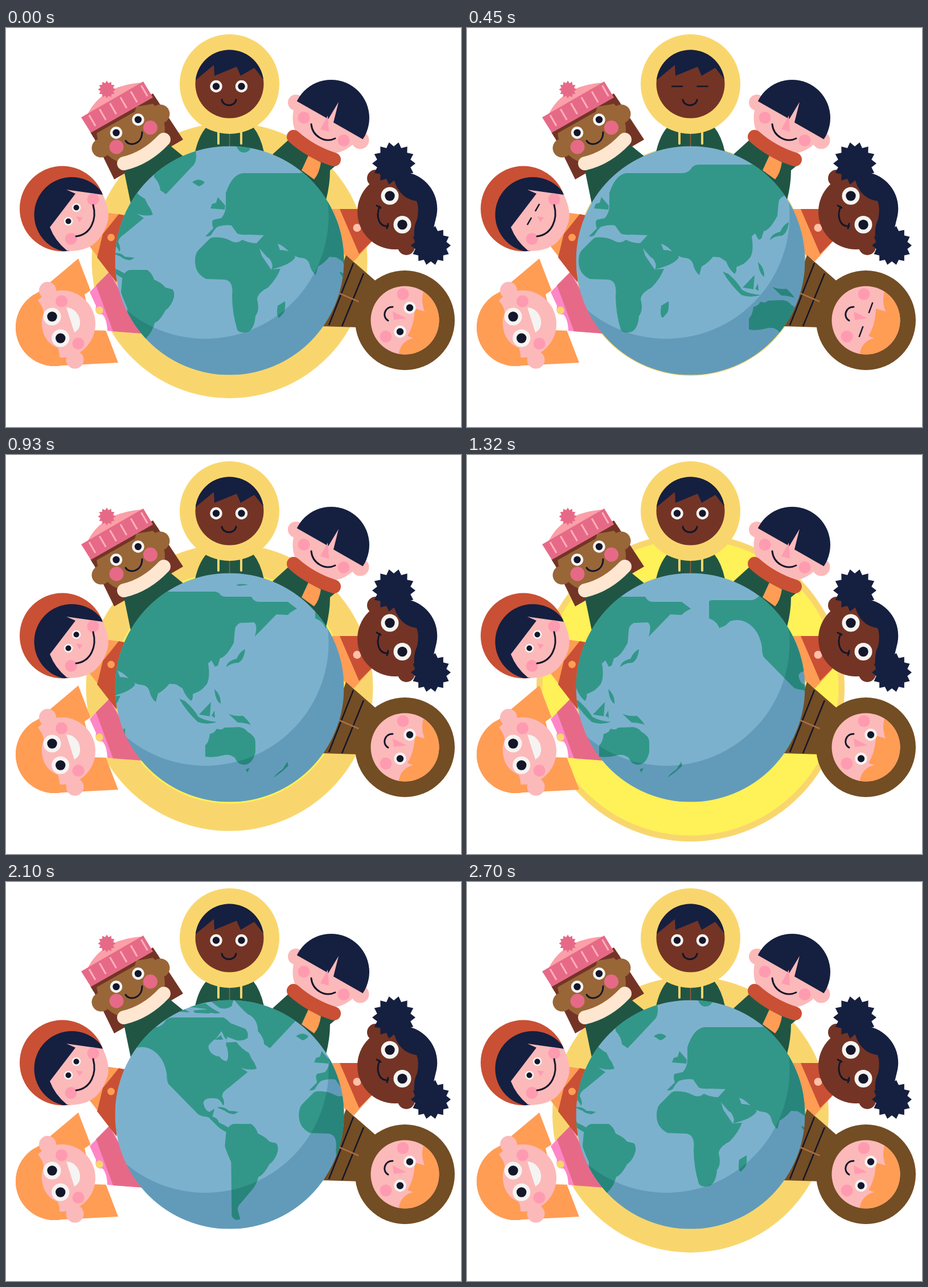
Animation of 799x701 px, one loop 2730 ms. Source, as an HTML page with a canvas:

```html
<!DOCTYPE html>
<html lang="en">
<head>
<meta charset="utf-8">
<title>Children around the globe</title>
<style>
html, body { margin: 0; width: 100%; height: 100%; overflow: hidden; background: #fff; }
canvas { display: block; width: 799px; height: 701px; }
</style>
</head>
<body>
<canvas id="stage" width="799" height="701"></canvas>
<script>
const ctx = document.getElementById('stage').getContext('2d');
const LOOP = 2730, STEP = 30, SPIN = 816 / 2700, WORLD = 817;
const CX = 392.5, CY = 408.5, R = 201;

const C = {
  navy: '#151f40', ink: '#14162a', white: '#f5f4f2', pink: '#fcb9ba', blush: '#ff9bb0',
  rose: '#e66a87', orange: '#ff9d55', rust: '#c95034', brown: '#733425', tan: '#996638',
  coat: '#734d24', green: '#205544', yellow: '#f9d66d', bright: '#fff158',
  sea: '#7cb1cd', land: '#329788', shade: '#cae0e7'
};

function dot(x, y, r, color) {
  ctx.fillStyle = color;
  ctx.beginPath();
  ctx.arc(x, y, r, 0, 7);
  ctx.fill();
}

function shape(d, color) {
  ctx.fillStyle = color;
  ctx.fill(new Path2D(d));
}

function line(d, color = C.ink, w = 3, cap = 'round') {
  ctx.strokeStyle = color;
  ctx.lineWidth = w;
  ctx.lineCap = cap;
  ctx.stroke(new Path2D(d));
}

function clipDot(x, y, r, draw) {
  ctx.save();
  ctx.beginPath();
  ctx.arc(x, y, r, 0, 7);
  ctx.clip();
  draw();
  ctx.restore();
}

function burst(x, y, r, inner, n, color, turn = 0) {
  ctx.fillStyle = color;
  ctx.beginPath();
  for (let i = 0; i < 2 * n; i++) {
    const a = turn + i * Math.PI / n, q = i % 2 ? inner : r;
    ctx.lineTo(x + q * Math.cos(a), y + q * Math.sin(a));
  }
  ctx.fill();
}

// Two eyes on a head tilted by `tilt` degrees
function eyes(closed, list, r, pupil, tilt, half = 10) {
  const a = tilt * Math.PI / 180, dx = half * Math.cos(a), dy = half * Math.sin(a);
  for (const [x, y] of list) {
    if (closed) {
      line(`M${x - dx},${y - dy}L${x + dx},${y + dy}`, C.ink, 2.5, 'butt');
    } else {
      dot(x, y, r, C.white);
      dot(x, y, pupil, C.ink);
    }
  }
}

// Smooth curve through [time, value] points
function curve(p, t) {
  const last = p.length - 1;
  if (t <= p[0][0]) return p[0][1];
  if (t >= p[last][0]) return p[last][1];
  let i = 0;
  while (t > p[i + 1][0]) i++;
  const slope = k => {
    const a = p[Math.max(k - 1, 0)], b = p[Math.min(k + 1, last)];
    return (b[1] - a[1]) / (b[0] - a[0]);
  };
  const [t0, v0] = p[i], [t1, v1] = p[i + 1], h = t1 - t0, u = (t - t0) / h, w = 1 - u;
  return v0 * w * w * (1 + 2 * u) + v1 * u * u * (3 - 2 * u) + h * u * w * (slope(i) * w - slope(i + 1) * u);
}

const outerHalo = [
  [0, 242], [70, 246], [220, 236], [340, 217], [450, 202.5], [530, 197], [600, 203], [760, 226],
  [930, 252], [1080, 266], [1230, 270.5], [1330, 270.3], [1650, 258.5], [1710, 255],
  [1880, 235], [2040, 206], [2120, 190], [2260, 188], [2480, 216], [2700, 242.5]
];
const innerHalo = [
  [840, 185], [930, 204], [1120, 241], [1320, 260], [1420, 262], [1560, 253],
  [1710, 231], [1860, 203], [1960, 184]
];

const africa = 'M350,378L358,370Q364,366 382,367L440,372L452,392L466,424L482,423Q475,441 460,456Q441,466 441,477Q446,496 438,506Q436,530 424,534Q410,537 406,530Q397,500 397,470Q400,444 384,442L352,441Q332,432 332,410Q332,396 338,390Z';
const westAsia = 'M350,366L364,352Q360,340 364,337L378,334Q386,325 386,312L386,290Q397,257 416,255L515,255Q526,254 531,245Q535,240 545,240L590,240L590,409L582,403L568,402Q558,414 548,419L544,434Q536,428 533,415Q530,405 520,404Q505,403 494,390Q486,382 477,379L481,390Q497,390 505,398L508,403Q500,416 466,424L444,390L430,372L385,368L362,362Q358,367 350,366Z';
const eastAsia = 'M580,240L648,240Q655,241 658,246Q661,249 668,249L712,249Q716,258 726,258L776,258L792,270Q780,276 776,281L756,280L718,319Q724,298 716,294L692,295Q683,300 683,308L681,330Q668,355 657,357L653,370L648,372L642,361L636,366Q640,390 634,402Q625,414 616,417L609,420Q610,428 606,432Q596,424 591,410L580,403Z';
const med = 'M358,368Q366,352 372,349Q385,345 396,347L406,361Q412,364 425,363L453,364L440,378Q427,378 415,372Q405,380 395,374Q380,366 358,368Z';
const redSea = 'M445,387L449,400L466,425L468,418Q466,406 458,402Z';
const nearIsles = 'M359,317L362,309L369,307L372,297L385,312L384,319ZM327,271Q338,262 349,271Q343,278 338,278ZM477,488L490,480Q491,494 488,500L480,509Q474,508 477,488ZM404,206H432Q428,219 417,219Q408,218 404,206Z';
const farIsles = 'M387,373Q388,362 405,358Q410,346 420,341Q418,360 408,365Q395,365 387,373ZM304,428L314,432Q330,446 338,460Q352,468 371,469Q352,475 337,469Q318,452 304,428ZM339,456L360,434L358,459ZM361,458L366,449L367,462ZM366,411Q378,422 377,437Q368,432 366,411ZM391,455Q405,460 416,458Q425,466 430,474Q418,470 407,470ZM404,228Q414,225 426,228L410,230Z';
const australia = 'M350,530V510Q356,506 358,490Q366,489 370,481Q380,484 383,479L410,478Q420,480 424,486Q438,494 438,504V522Q433,543 420,544Q408,546 402,532Q392,524 380,528Q365,532 350,530ZM421,552L428,550L424,558ZM494,539L496,546L485,556L470,567Q474,560 486,552Z';
const northAmerica = 'M189,275V257Q190,255 195,255H264Q275,253 280,243Q285,238 294,238H382Q388,242 394,248L420,258Q426,264 424,274Q416,280 404,278L388,272L387,282L404,281Q414,294 426,300Q430,310 436,318L440,328Q426,332 412,326L424,334L390,362Q380,368 379,376Q385,388 381,393Q376,380 366,380Q348,378 346,388Q349,402 357,404L366,398L362,412Q372,415 374,423Q386,428 394,434L388,440Q375,434 368,426L355,413Q342,412 337,408L285,355Q282,350 282,338Q278,312 262,299Q246,286 226,292L217,300L207,304Q203,292 189,287Z';
const southAmerica = 'M386,441Q390,426 400,425H430Q439,431 442,442Q456,448 462,456L474,459Q478,462 477,473Q473,488 462,496Q452,515 443,518Q440,530 434,538L413,563Q405,570 407,578L411,592Q402,597 396,587L395,492Q386,472 384,464Z';
const greenland = 'M442,262Q442,240 424,232Q412,222 398,204H512Q520,228 512,240L463,292L453,285Q452,272 442,262Z';
const westIsles = 'M370,396Q382,393 391,402Q400,402 408,404L400,408Q389,407 384,402ZM285,227L303,220Q316,224 322,229ZM328,226Q350,222 372,227L355,231L332,230ZM318,219L350,213Q360,222 376,230Q360,234 350,223ZM360,210L400,204L396,218Q386,225 374,221Z';
const hudson = 'M355,288Q362,278 368,276L378,262L384,274L388,277Q384,286 388,291Q392,308 387,315Q378,313 375,307Q356,304 355,288Z';

// [x offset, outline, colour]
const atlas = [
  [0, africa, C.land], [0, westAsia, C.land], [0, eastAsia, C.land], [0, nearIsles, C.land],
  [0, med, C.sea], [0, redSea, C.sea], [281, farIsles, C.land], [281, australia, C.land],
  [635, northAmerica, C.land], [635, southAmerica, C.land], [635, greenland, C.land],
  [635, westIsles, C.land], [635, hudson, C.sea], [635, 'M367,277L377,269L381,277Z', C.land]
].map(([x, d, color]) => [x, new Path2D(d), color]);

function globe(t) {
  clipDot(CX, CY, R, () => {
    ctx.fillStyle = C.sea;
    ctx.fillRect(CX - R, CY - R, 2 * R, 2 * R);
    for (const lap of [-1, 0, 1]) {
      for (const [x, path, color] of atlas) {
        ctx.save();
        ctx.translate(x + lap * WORLD - t * SPIN, 0);
        ctx.fillStyle = color;
        ctx.fill(path);
        ctx.restore();
      }
    }
    ctx.globalCompositeOperation = 'multiply';
    ctx.fillStyle = C.shade;
    ctx.beginPath();
    ctx.rect(0, 0, 799, 701);
    ctx.arc(350, 329.5, 216.5, 0, 2 * Math.PI);
    ctx.fill('evenodd');
  });
}

function hoodKid(shut) {
  shape('M352,174Q338,190 332,218H453Q447,190 434,174Z', C.green);
  line('M392.5,184V210', '#a0603b', 1.5);
  line('M373,178V203M413,178V203', C.yellow, 4);
  dot(392.5, 98.5, 87.5, C.yellow);
  dot(392.5, 98.5, 60, C.brown);
  clipDot(392.5, 98.5, 60, () =>
    shape('M330,94L365,65L366,84L405,68L412,84L436,70L455,94V30H330Z', C.navy));
  eyes(shut, [[369, 102.5], [413.5, 102.5]], 10.7, 6.2, 0);
  line('M379,126C381,139 402,139 404,126');
}

function bowlKid() {
  shape('M500,193L468,222L562,302Q569,275 569,250L586,236Z', C.green);
  shape('M531,224L519,250L541,266Q550,256 553,236Z', C.orange);
  dot(509, 131, 14, C.pink);
  dot(622, 197, 15.5, C.pink);
  dot(566.5, 158, 63, C.pink);
  line('M505,191Q535,218 576,231', C.rust, 24);
  clipDot(571, 158, 67, () =>
    shape('M494,119L566,160L584,130L575,166L650,209V80H494Z', C.navy));
  shape('M565,154L552,178L567,182Z', C.blush);
  dot(523, 157.5, 10.5, C.blush);
  dot(593, 197.5, 10.5, C.blush);
  line('M536,169C538,190 560,203 578,194');
}

function bunsKid(shut) {
  shape('M572,318H625L645,372L611,410L594,398Z', C.orange);
  shape('M586,318H625L645,372L620,397Z', C.rust);
  dot(616.5, 351, 7, '#ffbfa8');
  dot(649, 264, 15, C.brown);
  dot(703, 384, 15, C.brown);
  dot(683, 323, 66, C.brown);
  burst(681, 238, 38, 30, 14, C.navy);
  burst(746, 382, 35, 28, 14, C.navy);
  shape('M668,250L706,254A65,65 0 0 1 756,330L744,380L718,376Q714,352 722,336Q726,316 721,304Q694,300 684,274Q680,258 668,250Z', C.navy);
  eyes(shut, [[674, 295], [696, 345.5]], 15.5, 8.7, 65, 14);
  line('M656,314C649,331 655,350 671,348M651,312L658,316M669,352L671,344');
}

function coatKid(shut) {
  shape('M597,399L652,447L622,526L554,524Z', C.coat);
  line('M610,413L567,522M628,431L590,524', C.ink, 2.5, 'butt');
  line('M585,466L620,481', '#a86f42', 2.5, 'butt');
  dot(700.5, 513.5, 87.5, C.coat);
  dot(700.5, 513.5, 60, C.pink);
  clipDot(700.5, 513.5, 60, () =>
    shape('M733,450V463Q728,480 735,498L718,493Q717,522 705,541L715,545Q692,550 689,576L770,576V450Z', C.orange));
  shape('M679,498L703,510L681,513Z', C.blush);
  dot(697, 467.5, 10.5, C.blush);
  dot(667, 542, 10.5, C.blush);
  eyes(shut, [[709, 491.5], [692, 533.5]], 10.7, 6.2, 110);
  line('M679,490C664,490 660,508 671,514');
}

function longHairKid(shut) {
  shape('M127,405L45,474L78,594L197,588Z', C.orange);
  dot(85, 526, 68, C.orange);
  shape('M138,468L150,460L186,532L153,531Z', '#fff');
  shape('M147,464L182,428L242,537L178,532Q177,510 169,503Q155,505 158,488Z', '#ff86c6');
  shape('M158,452L181,429L242,537L188,533Z', C.rose);
  dot(164, 496, 6.7, C.yellow);
  dot(73, 461, 15, C.pink);
  dot(121, 583, 15.5, C.pink);
  dot(98, 520, 59, C.pink);
  clipDot(85, 526, 68, () =>
    shape('M10,450H40L51,473Q67,490 66,502Q60,516 65,534Q71,554 91,562Q96,574 94,600H10Z', C.orange));
  dot(97.5, 480, 10.5, C.blush);
  dot(127, 554.5, 10.5, C.blush);
  eyes(shut, [[81, 507], [95.7, 545]], 15.5, 8.7, 69, 14.5);
  shape('M106,491C122,492 131,506 130,520Q129,530 120,535Z', C.white);
}

function redHoodKid(shut) {
  shape('M174,324L210,329L165,407L147,384Z', C.orange);
  shape('M198,327L212,330L194,447L160,403L170,362Z', C.rust);
  dot(184.5, 368, 6.5, C.orange);
  dot(99, 317.5, 75, C.rust);
  clipDot(99, 317.5, 75, () => dot(115.5, 328, 66, C.navy));
  shape('M170,293Q184,322 178,342Q165,382 134,389Q118,393 107,391Q86,374 77,350L122,291L106,284Z', C.pink);
  dot(153, 301, 10.5, C.blush);
  dot(114, 370.5, 10.5, C.blush);
  shape('M123,331L135,333L129,341Z', C.blush);
  eyes(shut, [[123.5, 315.5], [109.5, 339.5]], 7.8, 5, 120, 7.3);
  line('M153,311C160,336 149,363 123,366');
}

function hatKid(shut) {
  shape('M148,180L190,266L311,196L258,115Z', C.brown);
  shape('M206,245L219,308L312,226L285,204Z', C.green);
  dot(167, 211, 16.5, C.tan);
  dot(271, 151, 16.5, C.tan);
  dot(219, 179, 60, C.tan);
  shape('M148,183L260,121L268,130Q258,134 229,138L226,147L157,186L154,193Z', C.brown);
  line('M207,238Q246,229 277,196', '#fee6d0', 24);
  shape('M143,152Q168,101 238,96Z', '#fb9fa8');
  burst(177, 108, 15.5, 11.5, 12, C.rose);
  shape('M132,157L241,94L258,122L149,184Z', C.rose);
  for (let i = 0; i < 6; i++) {
    const x = 146 + i * 18.3, y = 153 - i * 10.4;
    line(`M${x},${y}l11,19`, '#ffb0ba', 3, 'butt');
  }
  dot(194, 209, 12.5, C.rose);
  dot(253.5, 175, 12.5, C.rose);
  eyes(shut, [[193.5, 184], [232, 161]], 10.7, 6.2, -26);
  line('M210,198C216,209 239,205 239,183');
}

function frame(t) {
  const shutA = t >= 390 && t < 600, shutB = t >= 1590 && t < 1800;
  ctx.fillStyle = '#fff';
  ctx.fillRect(0, 0, 799, 701);
  dot(CX, CY, curve(outerHalo, t), C.yellow);
  dot(CX, CY, curve(innerHalo, t), C.bright);
  longHairKid(shutB);
  redHoodKid(shutA);
  hatKid(shutB);
  bowlKid();
  hoodKid(shutA);
  bunsKid(shutB);
  coatKid(shutA);
  globe(t);
}

const start = performance.now();
function tick() {
  const t = (performance.now() - start) % LOOP;
  frame(Math.floor(t / STEP) * STEP);
  requestAnimationFrame(tick);
}
tick();
</script>
</body>
</html>
```
